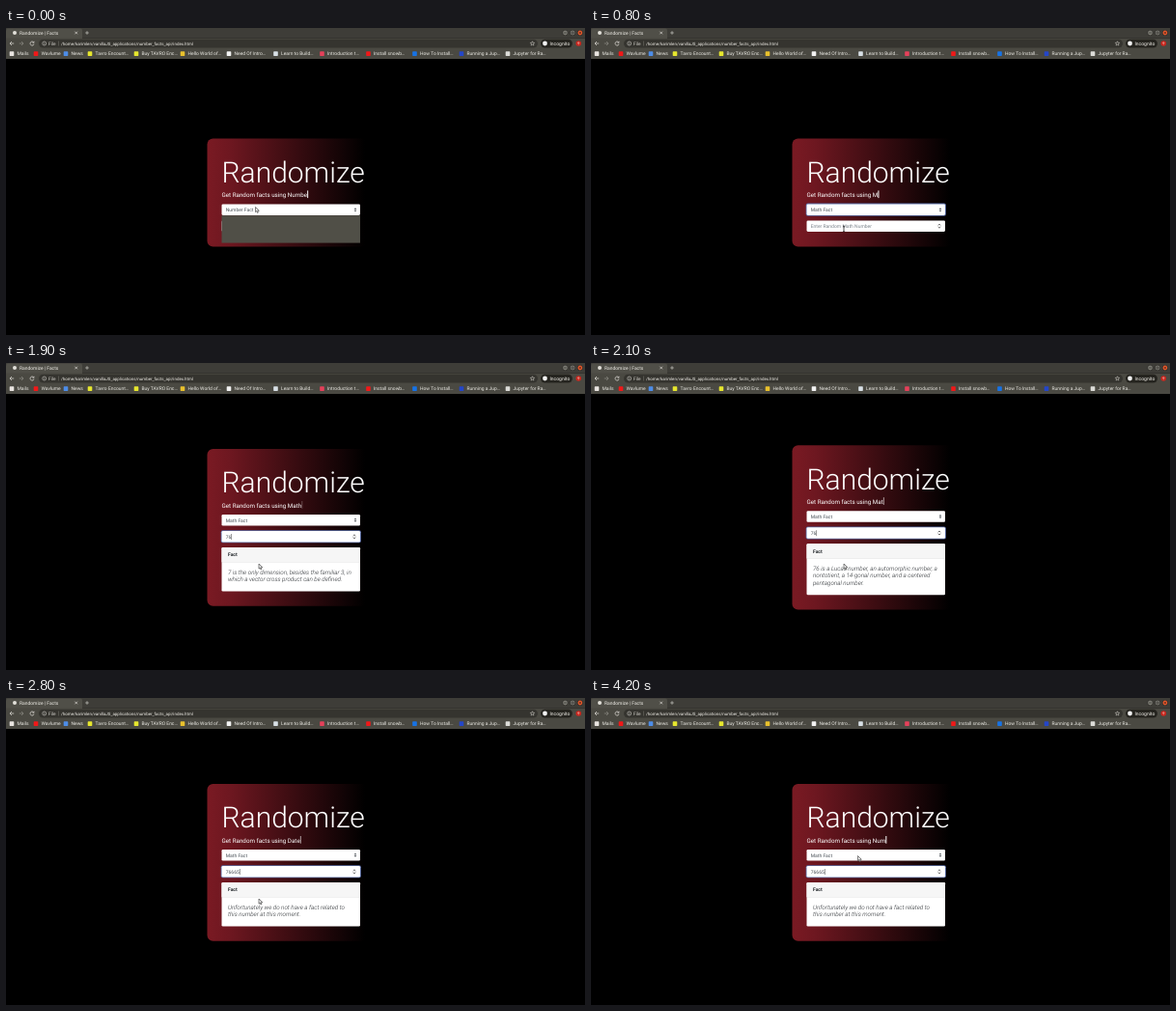
Write an HTML page with a canvas that moves like this. It is 600 px wide and 318 px high and loops after 4.3 s.

```html
<!DOCTYPE html>
<html lang="en">
<head>
<meta charset="utf-8">
<title>Randomize | Facts</title>
<style>
  html, body { margin: 0; width: 100%; height: 100%; overflow: hidden; background: #000; }
  canvas { display: block; width: 600px; height: 318px; }
</style>
</head>
<body>
<canvas id="stage"></canvas>
<script>
const LOOP = 4300, STEP = 100;
const canvas = document.getElementById('stage');
const ctx = canvas.getContext('2d');
const dpr = window.devicePixelRatio || 1;
canvas.width = 600 * dpr;
canvas.height = 318 * dpr;
ctx.scale(dpr, dpr);
ctx.textRendering = 'geometricPrecision';

// Timelines: [start ms, value...]
const typed = [
  [0, 'Numbe', 1], [100, 'Number', 1], [300, 'Numb', 1], [400, 'Num', 1], [500, 'N', 1],
  [600, '', 1], [700, 'M', 1], [1100, 'Ma', 1], [1500, 'Mat', .8], [1800, 'Math', .25],
  [2100, 'Mat', .6], [2200, 'M', 1], [2300, '', 1], [2400, 'D', 1], [2500, 'Da', 1],
  [2700, 'Dat', 1], [2800, 'Date', .6], [3100, 'Da', 1], [3200, '', 1],
  [3400, 'N', 0], [3700, 'Nu', .6], [4000, 'Num', 1]
];
const entered = [[0, ''], [1800, '7'], [1900, '76'], [2200, '766'], [2400, '7666'], [2800, '76665']];
const facts = [
  [0, []],
  [1900, ['7 is the only dimension, besides the familiar 3, in', 'which a vector cross product can be defined.']],
  [2100, ['76 is a Lucas number, an automorphic number, a', 'nontotient, a 14-gonal number, and a centered', 'pentagonal number.']],
  [2800, ['Unfortunately we do not have a fact related to', 'this number at this moment.']]
];
const mousePath = [[0, 258.5, 185.5], [300, 259, 202], [600, 262, 208], [3700, 262, 208], [4200, 276.5, 163.5]];
const bookmarks = [
  [6, '#e8e4e0', 'Mails'], [31, '#f01818', 'Wavlume'], [62, '#4d8de8', 'News'],
  [87, '#e6e62e', 'Tavro Encount…'], [135, '#e6e62e', 'Buy TAVRO Enc…'],
  [183, '#e8c02c', 'Hello World of…'], [231, '#f2f2f2', 'Need Of Intro…'],
  [279.5, '#d8e0e6', 'Learn to Build…'], [327.5, '#e5405a', 'Introduction t…'],
  [375.5, '#f01818', 'Install snowb…'], [423.5, '#1673e6', 'How To Install…'],
  [472, '#2446c8', 'Running a Jup…'], [520, '#dcdcd8', 'Jupyter for Ra…']
];

const at = (list, t) => list.filter(entry => entry[0] <= t).pop();

function follow(path, t) {
  const i = Math.max(1, path.findIndex(p => p[0] >= t));
  const [t0, x0, y0] = path[i - 1], [t1, x1, y1] = path[i];
  const k = (t - t0) / (t1 - t0);
  return [x0 + (x1 - x0) * k, y0 + (y1 - y0) * k];
}

function text(str, x, y, size, color, style = '400') {
  ctx.font = `${style} ${size}px Roboto, sans-serif`;
  ctx.fillStyle = color;
  ctx.fillText(str, x, y);
  return x + ctx.measureText(str).width;
}

function rect(x, y, w, h, color) {
  ctx.fillStyle = color;
  ctx.fillRect(x, y, w, h);
}

function round(x, y, w, h, r, fill) {
  ctx.beginPath();
  ctx.roundRect(x, y, w, h, r);
  ctx.fillStyle = fill;
  ctx.fill();
}

function dot(x, y, r, color) {
  ctx.beginPath();
  ctx.arc(x, y, r, 0, 7);
  ctx.fillStyle = color;
  ctx.fill();
}

function shape(d, x, y, stroke, fill, width = .7) {
  const path = new Path2D(d);
  ctx.save();
  ctx.translate(x, y);
  ctx.lineWidth = width;
  if (fill) { ctx.fillStyle = fill; ctx.fill(path); }
  if (stroke) { ctx.strokeStyle = stroke; ctx.stroke(path); }
  ctx.restore();
}

function drawBrowser() {
  const light = '#e2e0da';
  rect(0, 0, 600, 10.5, '#3e3d38');
  round(0, .5, 79, 11, [2, 2, 0, 0], '#504f48');
  rect(0, 10.5, 600, 21.5, '#4a4942');
  dot(9, 5, 2, light);
  text('Randomize | Facts', 14, 6.7, 4.94, '#f0eee8');
  shape('M-1.3-1.3L1.3 1.3M1.3-1.3L-1.3 1.3', 72.7, 5, light);
  shape('M-1.8 0H1.8M0-1.8V1.8', 84, 5, '#c8c6c0');
  ['#7b7a73', '#7b7a73', '#e8592c'].forEach((color, i) => {
    dot(579.5 + i * 7.7, 5, 2.9, '#2f2e2a');
    dot(579.5 + i * 7.7, 5, 2.4, color);
  });
  shape('M-1.3-1.3L1.3 1.3M1.3-1.3L-1.3 1.3', 594.9, 5, '#3b2018', null, .6);
  shape('M-1.3 0H1.3', 579.5, 5, '#2f2e2a');
  shape('M-1-1H1V1H-1Z', 587.2, 5, '#2f2e2a', null, .6);

  shape('M2.2 0H-2M0-2L-2 0L0 2', 6, 16, light);
  shape('M-2.2 0H2M0-2L2 0L0 2', 16, 16, '#8d8b84');
  shape('M1.6-1.2A2 2 0 1 0 2 .5M2-2.2V-.8H.4', 27, 16, light);
  round(34, 11.7, 517, 8.8, 4.4, '#35342f');
  shape('M2 0A2 2 0 1 1-2 0A2 2 0 1 1 2 0M0-.3V1.2M0-1.2V-.7', 39.7, 16, light, null, .5);
  text('File', 44, 17.7, 4.8, '#d0cec8');
  rect(54, 13.5, .5, 5, '#77756e');
  text('/home/karimlen/vanillaJS_applications/number_facts_api/index.html', 57, 17.7, 4.45, '#f2f0ea');
  shape('M0-2.2L.7-.7L2.2-.6L1.1.5L1.4 2L0 1.2L-1.4 2L-1.1.5L-2.2-.6L-.7-.7Z', 545.5, 16, light, null, .5);
  round(554, 11.7, 33, 8.8, 4.4, '#25241f');
  dot(558.5, 16, 2.4, '#f2f2f2');
  text('Incognito', 563.5, 17.7, 5, '#f6f4ee');
  dot(593.3, 16, 2.8, '#c8261e');
  shape('M0 1.4V-1.2M-1.1 0L0-1.3L1.1 0', 593.3, 16, '#f5c8c0', null, .5);

  for (const [x, color, label] of bookmarks) {
    round(x - 2.3, 24.3, 4.6, 4.6, .6, color);
    text(label, x + 5.5, 28.3, 4.95, '#ecebe5');
  }
}

function field(y, focused) {
  if (focused) round(222.7, y - .8, 145.2, 13.1, 2, '#5b6fa8');
  round(223.5, y, 143.5, 11.5, 1.3, '#fff');
}

function arrows(x, y) {
  shape('M-1.3-.5L0-2L1.3-.5ZM-1.3.5L0 2L1.3.5Z', x, y, null, '#343a40');
}

function drawFact(y, lines) {
  const height = 30.6 + (lines.length - 1) * 7.5 + 7.5;
  round(223.5, y, 143.5, height, 1.3, '#fff');
  round(223.5, y, 143.5, 15, [1.3, 1.3, 0, 0], '#f6f6f6');
  rect(223.5, y + 15, 143.5, .4, '#d8d8d8');
  text('Fact', 230, y + 9.3, 5, '#212529', '700');
  lines.forEach((line, i) => text(line, 230, y + 27.7 + i * 7.5, 6.25, '#212529', 'italic 300'));
}

function drawCard(t) {
  const [, lines] = at(facts, t);
  const [, word, caret] = at(typed, t);
  const [, number] = at(entered, t);
  const height = lines.length ? 147.6 + lines.length * 7.6 : 112;
  const top = 170.4 - height / 2;
  const math = t >= 400;

  const red = ctx.createLinearGradient(208.5, 0, 372, 0);
  red.addColorStop(0, '#7a1a23');
  red.addColorStop(.15, '#6d1720');
  red.addColorStop(1, '#000');
  round(208.5, top, 173.5, height, 6, red);

  text('Randomize', 223.5, top + 45.3, 30, '#fff', '300');
  const end = text('Get Random facts using ' + word, 223.5, top + 60.8, 6.25, '#fff');
  rect(end + .1, top + 54, 1, 7.7, `rgba(255,255,255,${caret})`);

  field(top + 68, math && t < 1300);
  text(math ? 'Math Fact' : 'Number Fact', 227.7, top + 75.7, 5, '#495057');
  arrows(362, top + 73.8);

  const inputFocus = t >= 1300;
  field(top + 85, inputFocus);
  const tail = text(number || 'Enter Random Math Number', 227.7, top + 92.6, 5, number ? '#495057' : '#7b838a');
  if (number) rect(tail + .2, top + 88, .5, 6, '#333');
  shape('M-1.3-.8L0-2L1.3-.8M-1.3.8L0 2L1.3.8', 361, top + 90.8, '#444', null, .8);

  if (!math) rect(223.5, top + 79.7, 143.5, 28.5, '#504f47');
  if (lines.length) drawFact(top + 102, lines);
}

function drawMouse(t) {
  const [x, y] = follow(mousePath, t);
  if (t >= 500 && t < 1900) {
    shape('M-1-3Q0-3 0-2V2Q0 3-1 3M1-3Q0-3 0-2M0 2Q0 3 1 3', x, y, '#222', null, .8);
  } else {
    shape('M0 0V5.2L1.2 4.1L2 6L2.9 5.6L2.1 3.8H3.8Z', x, y, '#333', '#eee', .6);
  }
}

function frame(now) {
  const t = Math.floor(now % LOOP / STEP) * STEP;
  rect(0, 0, 600, 318, '#000');
  drawBrowser();
  drawCard(t);
  drawMouse(t);
  requestAnimationFrame(frame);
}
requestAnimationFrame(frame);
</script>
</body>
</html>
```
